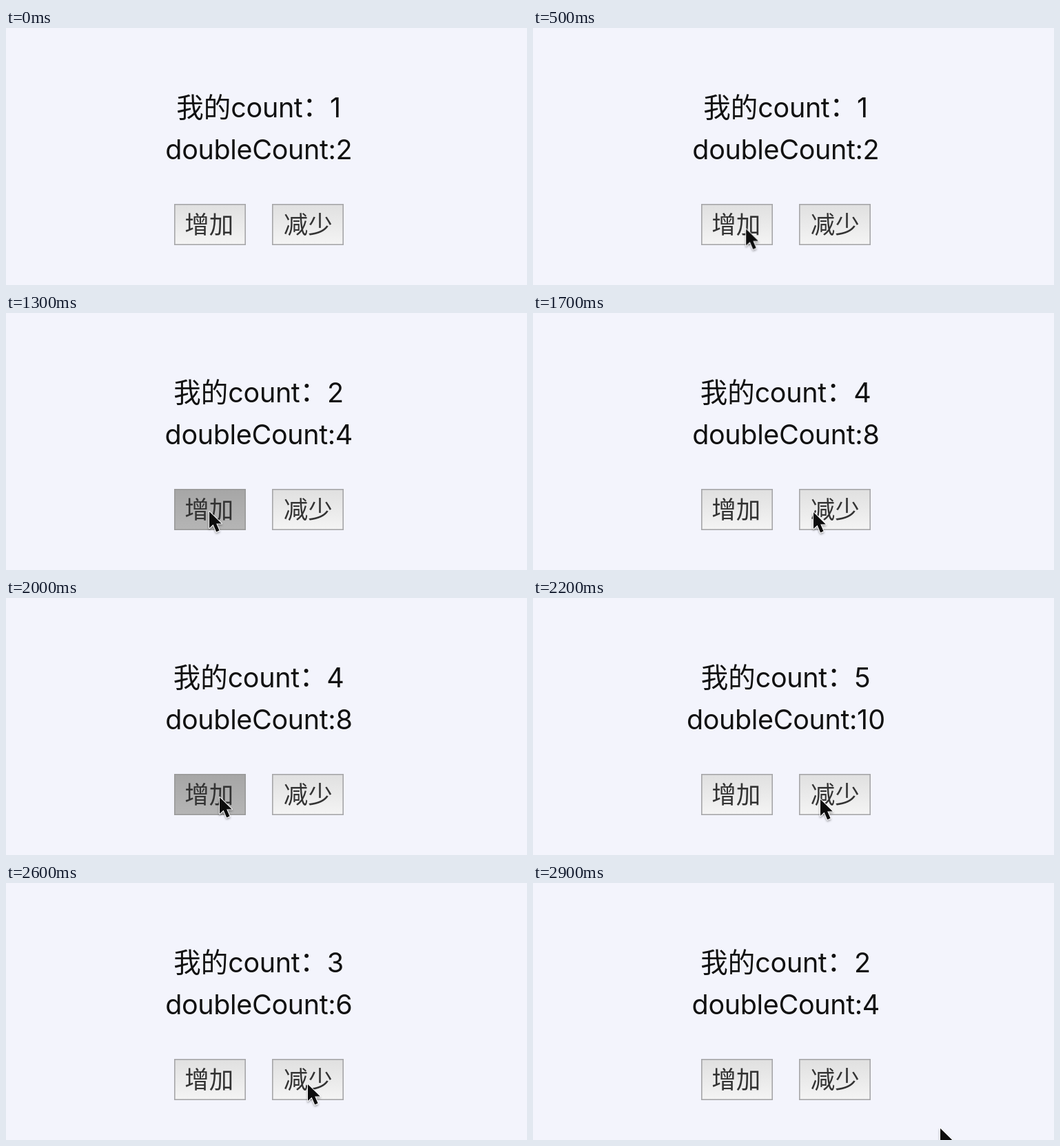
Write an HTML page that moves like this. It is 756 by 374 pixels and loops after 3 s.

```html
<!DOCTYPE html>
<html lang="zh-CN">
<head>
<meta charset="utf-8">
<title>Counter</title>
<style>
  html, body { margin: 0; width: 100%; height: 100%; overflow: hidden; background: #f3f4fc; }
  svg { display: block; width: 756px; height: 374px; }
  text { font-family: Inter, "Noto Sans CJK SC", "Noto Sans CJK", sans-serif; text-anchor: middle; }
  .line { font-size: 39.5px; font-weight: 370; letter-spacing: -.36px; fill: #111; }
  .line tspan { letter-spacing: 0; }
  .button text { font-size: 35.5px; fill: #333; }
  .button rect { fill: url(#face); stroke: #a6a6a8; stroke-width: 1.6; }
  .button.down rect { fill: url(#pressed); stroke: #999; }

  /* The script moves through this animation in whole ticks. */
  #cursor {
    animation: move 3s linear infinite paused;
    animation-delay: calc(var(--tick) * -.1s);
    opacity: var(--tick);
  }
  @keyframes move {
    0% { transform: translate(380px, 310px); }
    20%, 50% { transform: translate(295px, 289px); }
    56.667% { transform: translate(407px, 290px); }
    63.333%, 70% { transform: translate(310px, 290px); }
    73.333% { transform: translate(417px, 293px); }
    86.667%, 93.333% { transform: translate(438px, 293px); }
    96.667%, 100% { transform: translate(591px, 357px); }
  }
</style>
</head>
<body>
<svg viewBox="0 0 756 374">
  <defs>
    <linearGradient id="face" x2="0" y2="1">
      <stop stop-color="#e0e0e0"/><stop offset="1" stop-color="#f4f4f4"/>
    </linearGradient>
    <linearGradient id="pressed" x2="0" y2="1">
      <stop stop-color="#a6a6a6"/><stop offset="1" stop-color="#b5b5b5"/>
    </linearGradient>
    <filter id="shadow" x="-50%" y="-50%" width="200%" height="200%">
      <feDropShadow dx="0" dy="2" stdDeviation="1.6" flood-opacity=".35"/>
    </filter>
  </defs>
  <text class="line" x="366.7" y="130.4"><tspan>我的</tspan>count<tspan dy="-2">：</tspan><tspan id="count" dy="2">1</tspan></text>
  <text class="line" x="367" y="190.5">doubleCount:<tspan id="double">2</tspan></text>
  <g class="button" id="add">
    <rect x="244.8" y="256.8" width="102.4" height="58.4"/>
    <text x="294.7" y="298.6">增加</text>
  </g>
  <g class="button" id="sub">
    <rect x="386.8" y="256.8" width="102.4" height="58.4"/>
    <text x="438.2" y="298.6">减少</text>
  </g>
  <path id="cursor" d="M0 0V24L5.6 18.8 10.2 29.5 14.6 27.6 10.2 17.4H17.8Z"
    fill="#0b0b0d" stroke="#fff" stroke-width="1.8" paint-order="stroke" stroke-linejoin="round" filter="url(#shadow)"/>
</svg>
<script>
  const LOOP = 3000, TICK = 100, CLICK = 2;
  const $ = id => document.getElementById(id);

  // Each click holds the button for one tick, then changes the count.
  const bursts = [
    { id: 'add', step: 1, start: 11, clicks: 3 },
    { id: 'add', step: 1, start: 20, clicks: 1 },
    { id: 'sub', step: -1, start: 23, clicks: 3 }
  ];

  function draw() {
    const tick = Math.floor(performance.now() % LOOP / TICK);
    let count = 1, down = '';
    for (const { id, step, start, clicks } of bursts) {
      const age = tick - start;
      const done = Math.floor((age + 1) / CLICK);
      count += step * Math.max(0, Math.min(clicks, done));
      if (age >= 0 && age < clicks * CLICK && age % CLICK === 0) down = id;
    }
    $('count').textContent = count;
    $('double').textContent = count * 2;
    for (const id of ['add', 'sub']) $(id).classList.toggle('down', id === down);
    $('cursor').style.setProperty('--tick', tick);
    requestAnimationFrame(draw);
  }
  draw();
</script>
</body>
</html>
```
